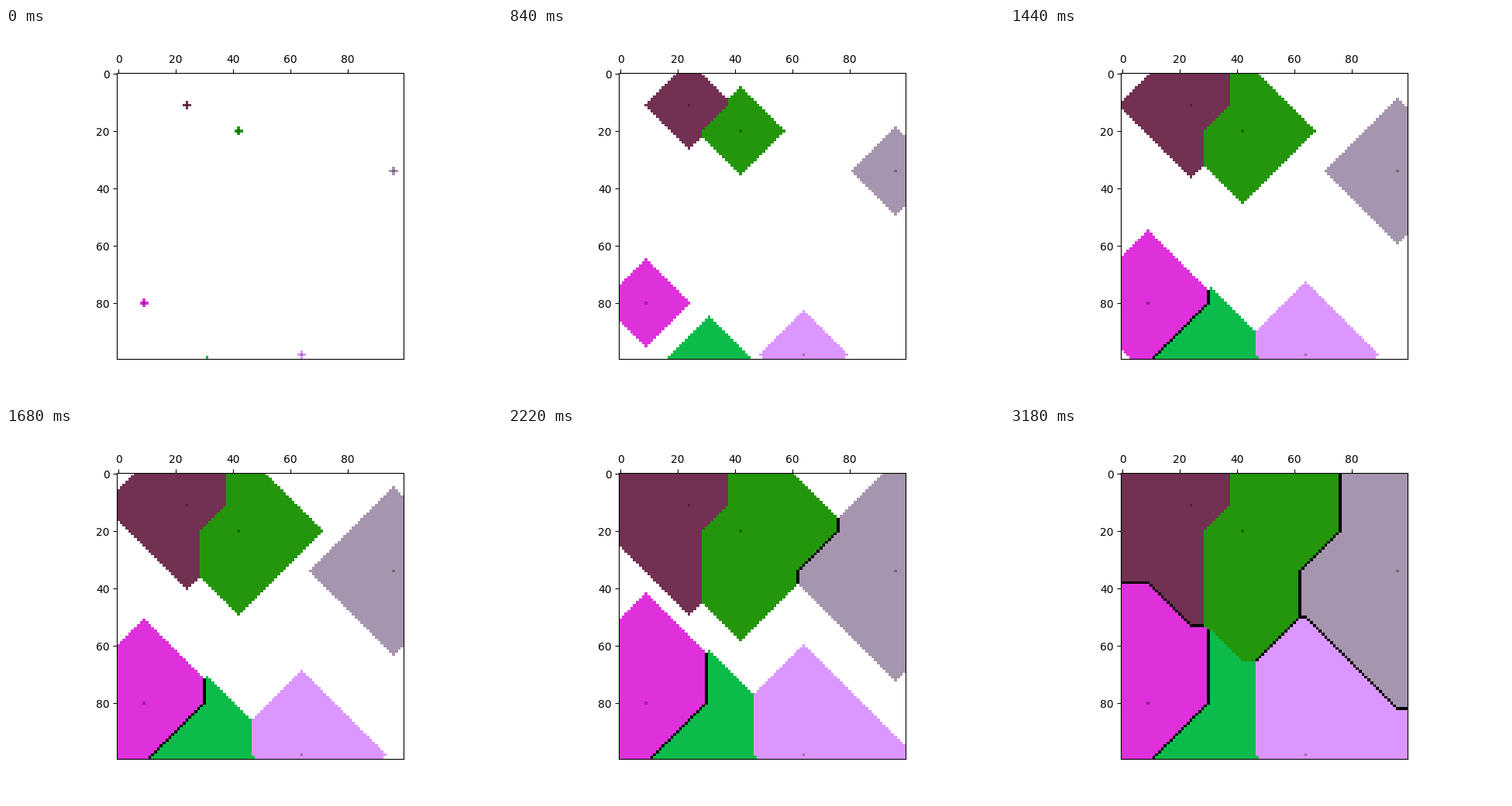
Animation of 640 by 480 pixels, one loop 6 s. Source, as a matplotlib script:

```python
import matplotlib.pyplot as plt
import numpy as np
from matplotlib.animation import FuncAnimation
from matplotlib.colors import to_rgb

SIZE = 100
FRAMES, INTERVAL = 100, 60
SEED_SHADE = 0.7

# Growing cells: colour and (x, y) seed; one seed lies just below the grid
SEEDS = {
    "#723052": (24, 11),
    "#24960c": (42, 20),
    "#a695ae": (96, 34),
    "#de30db": (9, 80),
    "#0dbb4a": (31, 100),
    "#db96ff": (64, 98),
}


def build_diagram():
    """Return the finished Manhattan Voronoi image and each pixel's distance."""
    rows, cols = np.mgrid[:SIZE, :SIZE]
    distances = np.array([abs(cols - x) + abs(rows - y)
                          for x, y in SEEDS.values()])
    nearest = distances.min(axis=0)
    palette = np.array([to_rgb(colour) for colour in SEEDS])
    image = palette[distances.argmin(axis=0)]
    image[nearest == 0] *= SEED_SHADE
    image[(distances == nearest).sum(axis=0) > 1] = 0  # shared borders
    return image, nearest


diagram, distance = build_diagram()


def grown(frame):
    reached = distance <= frame + 1
    return np.where(reached[..., None], diagram, 1.0)


fig, ax = plt.subplots(figsize=(6.4, 4.8), dpi=100)
picture = ax.imshow(grown(0), interpolation="nearest")
ax.xaxis.tick_top()
ax.set_xticks(range(0, SIZE, 20))
ax.set_yticks(range(0, SIZE, 20))


def update(frame):
    picture.set_data(grown(frame))
    return [picture]


animation = FuncAnimation(fig, update, frames=FRAMES, interval=INTERVAL,
                          repeat=True, repeat_delay=0)
plt.show()
```
